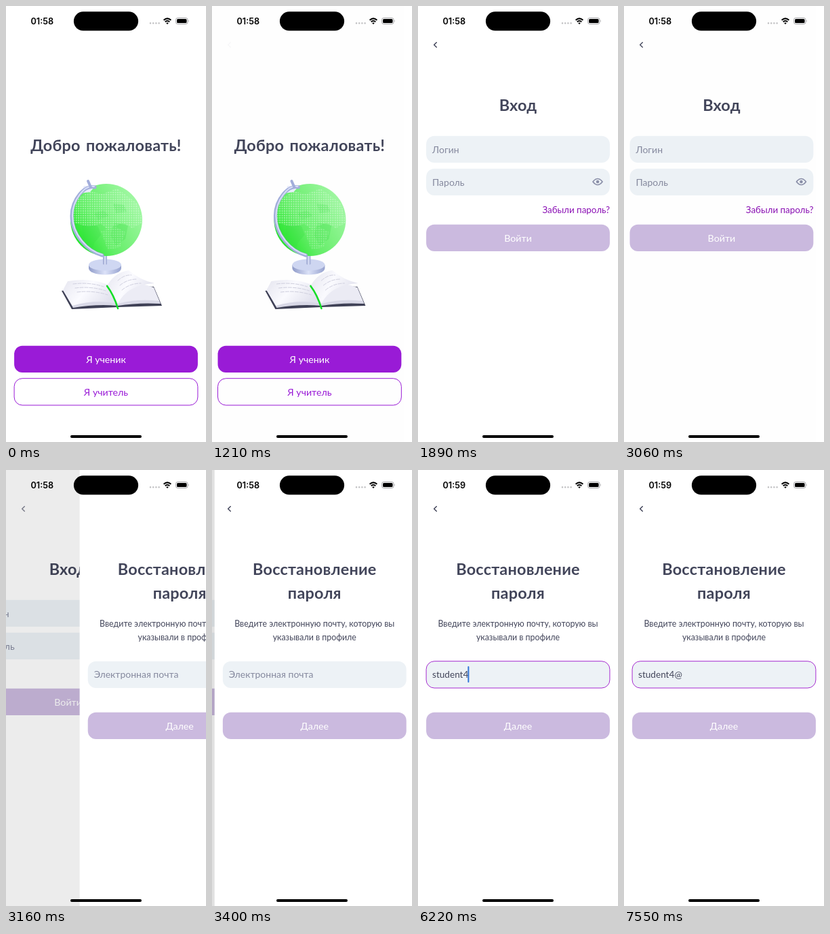
An HTML page for the animation above (8000 ms loop, 295x640 px).

```html
<!DOCTYPE html>
<html lang="ru">
<head>
<meta charset="utf-8">
<style>
html, body { margin: 0; width: 100%; height: 100%; overflow: hidden; background: #fff; }
svg { display: block; width: 100%; height: 100%; font: 14.2px Lato, "Open Sans", sans-serif; }
.mid { text-anchor: middle; }
.title { font-weight: 700; font-size: 23.4px; letter-spacing: .01em; word-spacing: .1em; fill: #42455a; }
.sub { font-size: 12.4px; fill: #42455a; }
.hint { font-size: 14px; fill: #85899e; }
.field { fill: #edf2f6; }
.off { fill: #cbbadf; }
.white { fill: #fff; }
.line { fill: none; stroke-linecap: round; stroke-linejoin: round; }
</style>
</head>
<body>
<svg viewBox="0 0 295 640">
  <defs>
    <rect id="box" x="12.1" y="-.3" width="270.8" height="39.3" rx="12"/>
    <rect id="page" width="295" height="640"/>
    <linearGradient id="green" x1="0" y1=".85" x2="1" y2=".25">
      <stop offset="0" stop-color="#10e418"/>
      <stop offset=".4" stop-color="#62ee66"/>
      <stop offset="1" stop-color="#a6f8a8"/>
    </linearGradient>
    <linearGradient id="metal">
      <stop offset="0" stop-color="#8f9bc9"/>
      <stop offset=".5" stop-color="#dce2f8"/>
      <stop offset="1" stop-color="#96a2cf"/>
    </linearGradient>
    <linearGradient id="paper" x2="1" y2=".4">
      <stop offset="0" stop-color="#e6e6f0"/>
      <stop offset=".5" stop-color="#fbfbff"/>
      <stop offset="1" stop-color="#e2e2ee"/>
    </linearGradient>
    <pattern id="dots" width="3.4" height="3.4" patternUnits="userSpaceOnUse">
      <circle cx="1.7" cy="1.7" r="1.1" fill="#d5fcd6"/>
    </pattern>
    <clipPath id="ball"><circle cx="148" cy="314" r="53"/></clipPath>
  </defs>

  <g id="welcome">
    <use href="#page" class="white"/>
    <text class="title mid" x="147.5" y="213">Добро пожаловать!</text>

    <path d="M122 380v5a24 9.5 0 0 0 48 0v-5z" fill="url(#metal)"/>
    <ellipse cx="146" cy="380" rx="24" ry="8.5" fill="#cfd7f2"/>
    <path d="M143 364h6v15q-3 2-6 0z" fill="url(#metal)"/>
    <circle cx="148" cy="314" r="53" fill="url(#green)"/>
    <g clip-path="url(#ball)">
      <path d="M112 322q12-6 24 2l4 12-10 12-4 18-12-8zM160 318l20 4-4 20-14 10-8-16zM130 304l14-4 8 8-16 6zM158 290l16 2 4 10-16 2z" fill="#35dc40" opacity=".25"/>
      <path d="M100 286l24-14 18 4 22-8 30 22 8 28-16 8-14-8-22 10-10-8-18 4-24-6z" fill="url(#dots)" opacity=".6"/>
      <path d="M140 330l22-6 14 8-8 22-18 4z" fill="url(#dots)" opacity=".4"/>
    </g>
    <path d="M115 264l17 0-8 9-14 2z" fill="#e9edfc"/>
    <path class="line" d="M131 266C116 262 97 284 97 308C97 336 120 360 142 366" stroke="#a3aedb" stroke-width="5"/>
    <path class="line" d="M130 265C116 262 98 285 98 308C98 335 120 359 142 365" stroke="#d9dff8" stroke-width="2"/>
    <path class="line" d="M121 257l4 9" stroke="#a3aedb" stroke-width="4"/>

    <path d="M82 418l15 27 68-3 65-2-12-28-67-3z" fill="#3f4156"/>
    <path d="M84 417l15 26q34-6 66-3 30-5 63-3l-10-24-68-4z" fill="#d9d9e7"/>
    <path d="M84 417l7-13q34-6 59 5l15 28q-32-7-67 3z" fill="url(#paper)"/>
    <path d="M150 409q30-9 67 4l9 20q-32-4-61 4z" fill="#ececf5"/>
    <path d="M150 409q11-18 31-21 16 14 38 19-40 2-54 30z" fill="url(#paper)"/>
    <path class="line" d="M99 408q24-3 45 4M102 414q24-3 45 4M105 420q23-3 45 4M165 403q10-9 20-8M168 410q11-9 25-9M171 417q12-10 28-10" stroke="#d0d0df" stroke-width="1" stroke-dasharray="5 2"/>
    <path class="line" d="M149 411q10 13 16 33" stroke="#13df25" stroke-width="2.6"/>

    <use href="#box" y="499" fill="#9a1bd7"/>
    <text class="white mid" x="147.5" y="524">Я ученик</text>
    <use href="#box" y="547" fill="#fff" stroke="#9a1bd7"/>
    <text class="mid" x="147.5" y="572" fill="#9a1bd7">Я учитель</text>
    <use id="dim1" href="#page"/>
  </g>

  <g id="login">
    <use href="#page" class="white"/>
    <text class="title mid" x="147.5" y="154">Вход</text>
    <use href="#box" y="191" class="field"/>
    <text class="hint" x="21" y="216">Логин</text>
    <use href="#box" y="239" class="field"/>
    <text class="hint" x="21" y="264">Пароль</text>
    <path class="line" d="M258 258q7-9 14 0q-7 9-14 0z" stroke="#8a8fa8" stroke-width="1.7"/>
    <circle cx="265" cy="258" r="2.3" fill="#8a8fa8"/>
    <text x="283" y="304" font-size="13.4" text-anchor="end" fill="#8a0fb4">Забыли пароль?</text>
    <use href="#box" y="321" class="off"/>
    <text class="white mid" x="147.5" y="346">Войти</text>
    <use id="dim2" href="#page"/>
  </g>

  <g id="reset">
    <use href="#page" class="white"/>
    <g class="mid">
      <text class="title" x="147.5" y="154">Восстановление</text>
      <text class="title" x="147.5" y="189">пароля</text>
      <text class="sub" x="147.5" y="230">Введите электронную почту, которую вы</text>
      <text class="sub" x="147.5" y="250">указывали в профиле</text>
    </g>
    <use id="mail" href="#box" y="281" class="field"/>
    <text id="hint" class="hint" x="21" y="305">Электронная почта</text>
    <text id="typed" x="21" y="305" font-size="13.6" fill="#42455a"></text>
    <rect id="caret" y="288" width="2" height="24" rx="1" fill="#2f74d8"/>
    <use href="#box" y="356" class="off"/>
    <text class="white mid" x="147.5" y="381">Далее</text>
  </g>

  <path id="back" class="line" d="M27.3 53.5l-3.6 3.5 3.6 3.5" stroke="#42455a" stroke-width="1.5"/>

  <text id="clock" x="36.5" y="26.5" font-family="Inter, sans-serif" font-size="12.7" font-weight="600"></text>
  <rect x="99.9" y="8.3" width="95.2" height="28" rx="14"/>
  <path class="line" d="M213 25.3h13" stroke="#c2c2c4" stroke-width="2.6" stroke-dasharray="0 4.2"/>
  <path d="M232.6 20.8q5.4-4.8 10.8 0M234.7 23.2q3.3-2.8 6.6 0" fill="none" stroke="#000" stroke-width="2"/>
  <path d="M236.2 25q1.8-1.5 3.6 0l-1.8 1.9z"/>
  <rect x="250.5" y="17.5" width="17.5" height="9" rx="2.8" fill="#fff" stroke="#a5a5a8"/>
  <rect x="252" y="19" width="14.5" height="6" rx="1.5"/>
  <path d="M269 20.5q1.6 1.5 0 3z" fill="#a5a5a8"/>
  <rect x="95" y="630.1" width="105" height="3.8" rx="1.9"/>
</svg>
<script>
const $ = id => document.getElementById(id);
const W = 295, LOOP = 8000, FOCUS = 4270;
const LOGIN = 'student4@';
const pushes = [[1210, 1330, 1440, 1560, 1670], [3060, 3160, 3280, 3390, 3510]];
// [time, letters entered]
const keys = [[5100, 1], [5210, 2], [5360, 3], [5550, 4], [5690, 5], [5810, 6], [6220, 8], [7190, 9]];

// Critically damped spring, sampled at the screen's refresh steps
function push(t, steps) {
  if (t < steps[0]) return 0;
  if (t >= steps[4]) return 1;
  const at = steps.filter(s => s <= t).pop();
  const x = 18.3 * (at - steps[0] + 17.2) / 1000;
  return 1 - (1 + x) * Math.exp(-x);
}

const move = (id, x) => $(id).setAttribute('transform', `translate(${x})`);
const show = (id, on) => $(id).style.display = on ? '' : 'none';

function draw(t) {
  const [a, b] = pushes.map(s => push(t, s));
  move('welcome', -0.3 * W * a);
  move('login', W * (1 - a) - 0.3 * W * b);
  move('reset', W * (1 - b));
  $('dim1').style.opacity = 0.12 * a;
  $('dim2').style.opacity = 0.12 * b;
  $('back').style.opacity = a * (1 - 1.4 * b * (1 - b));

  const focused = t >= FOCUS;
  $('clock').textContent = focused ? '01:59' : '01:58';
  $('mail').setAttribute('stroke', focused ? '#a62bd0' : 'none');

  const key = keys.filter(k => k[0] <= t).pop();
  const typed = $('typed');
  typed.textContent = key ? LOGIN.slice(0, key[1]) : '';
  show('hint', !key);
  show('caret', focused && !(t >= 4940 && t < 5100) && t < 7550);
  $('caret').setAttribute('x', 21 + (key ? typed.getComputedTextLength() - 1 : 0));
}

function frame() {
  draw(performance.now() % LOOP);
  requestAnimationFrame(frame);
}
frame();
</script>
</body>
</html>
```
